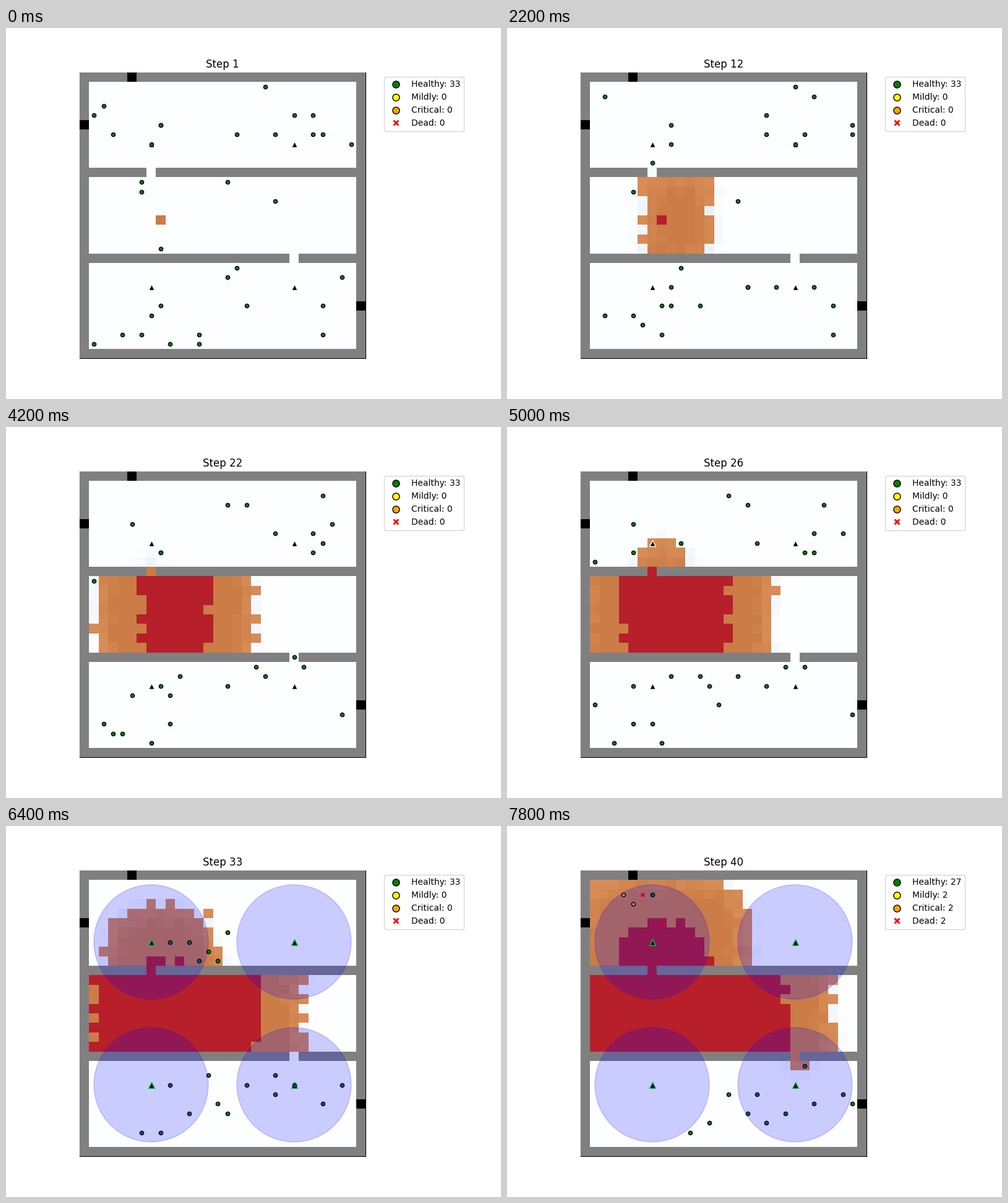
These frames come from a looping animation (800 by 600 pixels, 8 s). A matplotlib script:

```python
import math

import matplotlib.pyplot as plt
import numpy as np
from matplotlib.animation import FuncAnimation
from matplotlib.lines import Line2D
from matplotlib.patches import Circle

SIZE = 30
STEPS = 40
BURN_TIME = 10
ALARM_STEP = 27
SIGHT = 4                                    # distance at which an exit is noticed
ORIGIN = (15, 8)
DOORS = [(10, 7, 14), (19, 22, 35)]          # row, column, step it catches fire
EXITS_UP = [(5, 0), (0, 5)]
EXITS_DOWN = [(29, 24)]
DETECTORS = [(x, y) for y in (7, 22) for x in (7, 22)]

# Rows of a room, fire centre (row, column), first step, weight of rows.
FIRES = [
    ((11, 18), (15, 9.5), 3.8, 0.6),
    ((1, 9), (10, 8), 19.5, 0.9),
    ((20, 28), (19, 22.5), 37, 1),
]
PACE = 2.2                                   # steps for the fire to cross a cell

# Starting cells (column, row).
UPPER = [(24, 4), (25, 6), (24, 6), (28, 7), (19, 1), (2, 3), (1, 4), (8, 5),
         (8, 5), (3, 6), (7, 7), (22, 4), (16, 6), (20, 6)]
MIDDLE = [(6, 11), (6, 12), (15, 11), (20, 13), (8, 18)]
LOWER = [(16, 20), (15, 21), (27, 21), (8, 24), (17, 24), (25, 24), (7, 25),
         (4, 27), (6, 27), (12, 27), (25, 27), (1, 28), (9, 28), (12, 28)]
FALLS = [(4, 2), (5, 3), (6, 2), (8, 5)]     # where the first four end up

GRAY = np.array([128, 128, 128])
FLOOR = np.array([253, 254, 255])
HAZE = np.array([200, 222, 241])
FRESH = np.array([215, 140, 86])
FLAME = np.array([203, 124, 71])
BURNT = np.array([183, 31, 43])


def build_plan():
    wall = np.zeros((SIZE, SIZE), bool)
    wall[[0, -1], :] = wall[:, [0, -1]] = True
    base = np.empty((SIZE, SIZE, 3))
    base[:] = FLOOR
    for row, col, _ in DOORS:
        wall[row] = True
        wall[row, col] = False
        base[row, col] = 255
    base[wall] = GRAY
    for x, y in EXITS_UP + EXITS_DOWN:
        base[y, x] = 0
    return wall, base


def build_fire(rng):
    """Step at which each cell ignites: ragged fronts around each centre."""
    lit = np.full((SIZE, SIZE), math.inf)
    rows, cols = np.mgrid[:SIZE, :SIZE]
    noise = rng.uniform(-1.2, 1.2, lit.shape)
    for (top, bottom), (cy, cx), start, weight in FIRES:
        reach = (abs(cols - cx) ** 3 + abs(weight * (rows - cy)) ** 3) ** (1 / 3)
        room = ~wall & (rows >= top) & (rows <= bottom)
        lit[room] = np.ceil(start + PACE * reach + noise)[room]
    for row, col, when in DOORS:
        lit[row, col] = when
    lit[ORIGIN] = 1
    return lit


def build_heat():
    """Heat seeping from the fire into open cells, one field per step."""
    free = (~wall).astype(float)
    heat = np.zeros((SIZE, SIZE))
    fields = []
    for step in range(1, STEPS + 1):
        if step > 1:
            flow = sum(np.roll(free, s, a) * (np.roll(heat, s, a) - heat)
                       for s in (-1, 1) for a in (0, 1))
            heat = heat + 0.13 * free * flow
        heat[lit <= step] = 1
        fields.append(heat.copy())
    return fields


def floor_image(step):
    warm = np.clip(heat[step - 1], 0, 1)[..., None]
    img = np.where(wall[..., None], base, base + warm * (HAZE - FLOOR))
    fire = lit <= step
    age = np.where(fire, step - np.where(fire, lit, 0), 0)
    shade = np.clip(age / 4 + (lit == 1), 0, 1)[..., None]
    img = np.where(fire[..., None], FRESH + shade * (FLAME - FRESH), img)
    img[lit + BURN_TIME <= step] = BURNT
    return np.clip(np.rint(img), 0, 255).astype(np.uint8)


def around(x, y):
    return [(x + dx, y + dy) for dx in (-1, 0, 1) for dy in (-1, 0, 1)
            if 0 <= x + dx < SIZE and 0 <= y + dy < SIZE]


def distance_map(goals):
    """Walking distance from every open cell to the nearest goal."""
    dist = np.full((SIZE, SIZE), math.inf)
    queue = list(goals)
    for x, y in queue:
        dist[y, x] = 0
    for x, y in queue:
        for nx, ny in around(x, y):
            if not wall[ny, nx] and dist[ny, nx] == math.inf:
                dist[ny, nx] = dist[y, x] + 1
                queue.append((nx, ny))
    return dist


def walk(start, dist, rng):
    """Cell at each step: wander, then make for the goal once alarmed."""
    x, y = start
    cells = {1: start}
    for step in range(2, STEPS + 1):
        alarm = step >= ALARM_STEP
        hurry = 2 if alarm and y < 10 else 1
        urge = 0.8 if alarm else 0.6 if 10 <= y <= 19 else 0.3
        for _ in range(hurry):
            near = dist[y, x] <= SIGHT or 10 <= y <= 19
            if (alarm or near) and rng.random() < urge:
                spots = [c for c in around(x, y)
                         if alarm or lit[c[1], c[0]] > step]
                if spots:
                    x, y = min(spots, key=lambda c: dist[c[1], c[0]]
                               + 0.5 * rng.random())
            elif not alarm and rng.random() < 0.6:
                spots = [c for c in around(x, y)
                         if not wall[c[1], c[0]] and lit[c[1], c[0]] > step]
                if spots:
                    x, y = spots[rng.integers(len(spots))]
        if (x, y) in EXITS_UP + EXITS_DOWN:
            break
        cells[step] = (x, y)
    return cells


def build_crowd(rng):
    up, down = distance_map(EXITS_UP), distance_map(EXITS_DOWN)
    maps = [distance_map([fall]) for fall in FALLS]
    maps += [up] * (len(UPPER) - len(FALLS))
    maps += [up if x <= 7 else down for x, _ in MIDDLE]
    maps += [down] * len(LOWER)
    return [walk(cell, dist, rng)
            for cell, dist in zip(UPPER + MIDDLE + LOWER, maps)]


def tally(step):
    """Healthy, mildly hurt, critical, dead."""
    if step < 38:
        return 33, 0, 0, 0
    return {38: (29, 4, 0, 0), 39: (27, 2, 4, 0)}.get(step, (27, 2, 2, 2))


def condition(index, step):
    if index >= len(FALLS) or step < 38:
        return "Healthy"
    if step == 38:
        return "Mildly"
    return "Dead" if step >= 40 and index >= 2 else "Critical"


wall, base = build_plan()
lit = build_fire(np.random.default_rng(3))
heat = build_heat()
crowd = build_crowd(np.random.default_rng(7))

fig, ax = plt.subplots(figsize=(8, 6), dpi=100)
fig.subplots_adjust(left=0.125, right=0.75, bottom=0.11, top=0.88)
floor = ax.imshow(floor_image(1), interpolation="nearest", zorder=3)
ax.set_xticks([])
ax.set_yticks([])
title = ax.set_title("Step 1")

sensors = ax.scatter(*zip(*DETECTORS), marker="^", s=50, c="black",
                     edgecolors="white", linewidths=1, zorder=4)
zones = [ax.add_patch(Circle(c, 6, color="blue", alpha=0.2, zorder=8))
         for c in DETECTORS]

COLORS = {"Healthy": "green", "Mildly": "yellow",
          "Critical": "orange", "Dead": "red"}
people, handles = {}, []
for name, color in COLORS.items():
    dead = name == "Dead"
    marker = "X" if dead else "o"
    people[name] = ax.scatter([], [], s=20, marker=marker, c=color, zorder=5,
                              edgecolors="red" if dead else "black",
                              linewidths=0.4 if dead else 1)
    handles.append(Line2D([0], [0], marker=marker, color="w", ms=8,
                          markerfacecolor=color, label=name + ": 33",
                          markeredgecolor="w" if dead else "black"))
legend = ax.legend(handles=handles, loc="upper left", bbox_to_anchor=(1.05, 1))
ax.set_xlim(-0.5, SIZE - 0.5)
ax.set_ylim(SIZE - 0.5, -0.5)


def draw(frame):
    step = frame + 1
    title.set_text(f"Step {step}")
    floor.set_data(floor_image(step))
    alarm = step >= ALARM_STEP
    sensors.set_edgecolor("lime" if alarm else "white")
    for zone in zones:
        zone.set_visible(alarm)
    for name, dots in people.items():
        spots = [cells[step] for i, cells in enumerate(crowd)
                 if step in cells and condition(i, step) == name]
        dots.set_offsets(np.array(spots, float).reshape(-1, 2))
    for text, name, count in zip(legend.get_texts(), COLORS, tally(step)):
        text.set_text(f"{name}: {count}")
    return []


anim = FuncAnimation(fig, draw, frames=STEPS, interval=200,
                     repeat=True, repeat_delay=0)
plt.show()
```
